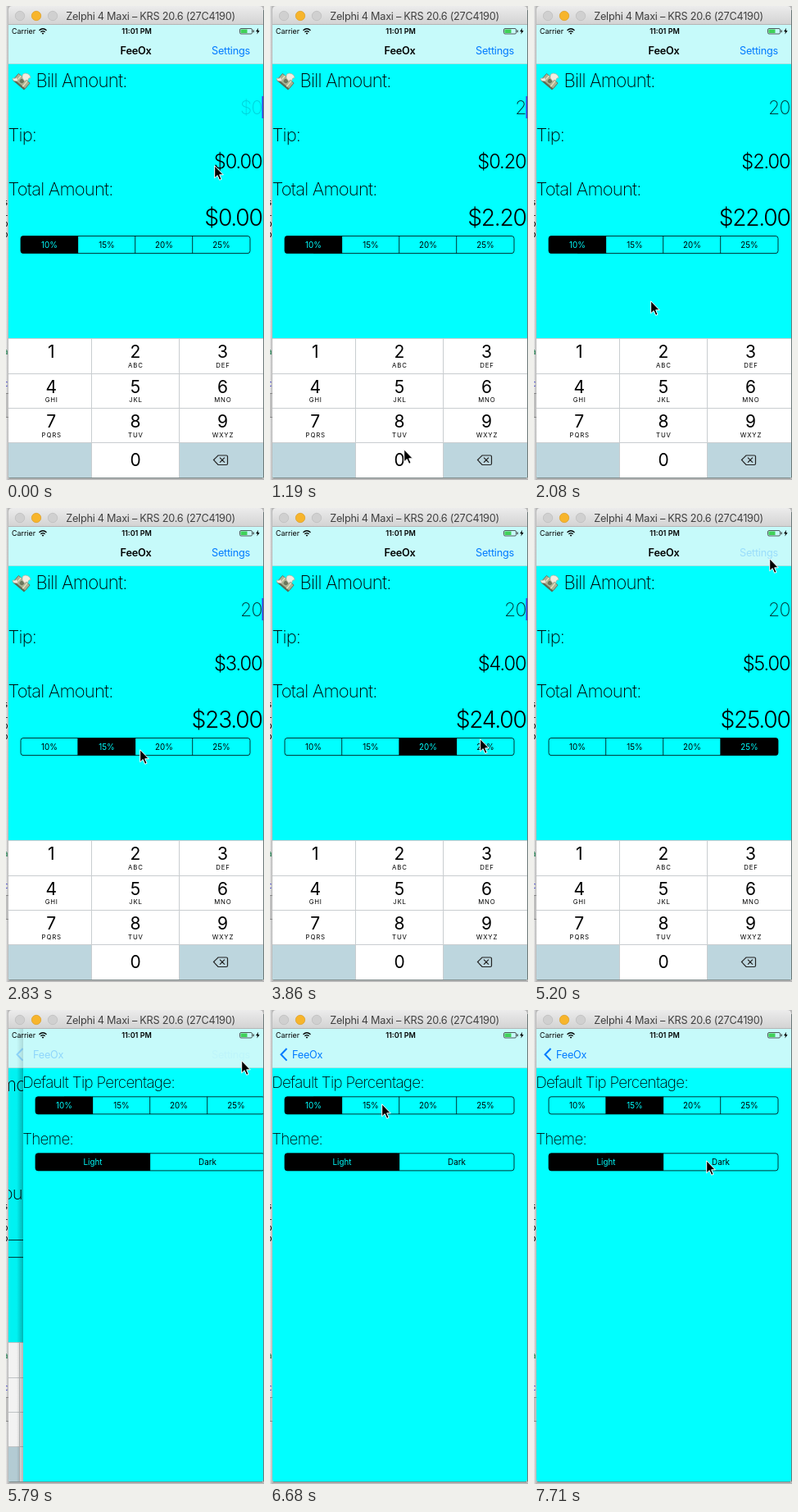
Recreate the animation shown at these times as an HTML page. Size 315 px wide and 578 px high, loop 8000 ms.

```html
<!DOCTYPE html>
<html lang="en">
<head>
<meta charset="utf-8">
<title>Tip calculator</title>
<style>
  html, body { margin: 0; width: 100%; height: 100%; overflow: hidden; background: #ddd; }
  svg { display: block; width: 315px; height: 578px; font-family: Inter, Roboto, sans-serif; }
  .thin { font-weight: 200; letter-spacing: -.036em; }
  .light { font-weight: 300; letter-spacing: -.045em; }
  .bar { font-size: 12.7px; letter-spacing: -.02em; }
  .blue { fill: #007aff; }
  .bold { font-weight: 600; }
  .mid { text-anchor: middle; }
  .end { text-anchor: end; }
  .letters { font-size: 7.8px; letter-spacing: .8px; }
  .code { font: 11px "DejaVu Sans Mono", monospace; }
</style>
</head>
<body>
<svg viewBox="0 0 315 578">
  <defs>
    <linearGradient id="title" x2="0" y2="1"><stop stop-color="#ececec"/><stop offset="1" stop-color="#d2d2d2"/></linearGradient>
    <linearGradient id="edge"><stop stop-color="#e6e6e6"/><stop offset="1" stop-color="#b4b4b4"/></linearGradient>
    <linearGradient id="shade"><stop stop-color="#000" stop-opacity="0"/><stop offset="1" stop-color="#000" stop-opacity=".25"/></linearGradient>
    <clipPath id="screen"><path d="M3 23H314V572q0 3-3 3H6q-3 0-3-3Z"/></clipPath>
    <clipPath id="strip"><path d="M0 0H3V578H0Z"/></clipPath>
  </defs>
  <g id="window"></g>
  <g id="app" clip-path="url(#screen)"></g>
  <path id="pointer" d="m-.3 .8v15l3.5-3.2 2.5 5.7 2.4-1-2.4-5.5h4.6z" stroke="#fff"/>
</svg>
<script>
const LOOP = 8000, TICK = 148.5, LEAD = 12;
const CYAN = '#0ff', RATES = [10, 15, 20, 25];
const $ = id => document.getElementById(id);

// Times below are counted in ticks.
const POINTER = [
  [0, 255, 194], [5, 158, 424], [6, 158, 426], [8, 164, 540], [10, 160, 556],
  [16, 137, 290], [17, 137, 290], [19, 164, 294], [21, 192, 294], [23, 192, 293],
  [26, 257, 281], [28, 259, 288], [30, 270, 107], [34, 288, 61], [39, 288, 61],
  [45, 137, 114], [47, 137, 114], [52, 211, 183]
];
const BILL = [[0, 0], [6, 2], [10, 20]];
const RATE = [[0, 0], [18, 1], [23, 2], [28, 3]];
const DEFAULT_RATE = [[0, 0], [47, 1]];
const CARET_OFF = [[3, 5], [14, 17], [21, 24], [28, 31], [35, 99]];
const PRESS_KEY = 5, PRESS_SETTINGS = 35, PUSH = 39;

const latest = (steps, n) => steps.filter(s => s[0] <= n).pop()[1];

function pointerAt(n) {
  const next = POINTER.findIndex(p => p[0] > n);
  if (next < 0) return POINTER[POINTER.length - 1].slice(1);
  const a = POINTER[next - 1], b = POINTER[next];
  const u = (n - a[0]) / (b[0] - a[0]), k = u * u * (3 - 2 * u);
  return [1, 2].map(i => a[i] + (b[i] - a[i]) * k);
}

const rect = (x, y, w, h, fill, more = '') =>
  `<rect x="${x}" y="${y}" width="${w}" height="${h}" fill="${fill}" ${more}/>`;
const text = (x, y, str, cls = '', size = '', fill = '') =>
  `<text x="${x}" y="${y}" class="${cls}" ${size && `font-size="${size}"`} ${fill && `fill="${fill}"`}>${str}</text>`;
const group = (content, dx = 0, opacity = 1) =>
  `<g transform="translate(${dx})" opacity="${opacity}">${content}</g>`;
const line = (d, stroke, width = 1) =>
  `<path d="${d}" fill="none" stroke="${stroke}" stroke-width="${width}"/>`;

function segments(y, labels, chosen) {
  const x = 18, width = 280, height = 21.1, stroke = .8;
  const w = width / labels.length, last = labels.length - 1;
  const left = x + chosen * w, isEnd = chosen === 0 || chosen === last;
  let out = rect(left, y, w, height, '#000', isEnd ? 'rx="3"' : '');
  if (isEnd) out += rect(chosen ? left : left + w / 2, y, w / 2, height, '#000');
  out += rect(x, y, width, height, 'none', `rx="3" stroke="#000" stroke-width="${stroke}"`);
  labels.forEach((label, i) => {
    if (i) out += line(`M${x + i * w - .3} ${y}v${height}`, '#000', stroke);
    out += text(x + (i + .5) * w, y + 14.2, label, 'mid', 9.8, i === chosen ? CYAN : '#000');
  });
  return out;
}

const percents = RATES.map(r => r + '%');

const flyingMoney = `
  <g transform="translate(19 92)">
    <g transform="rotate(40)">
      <rect x="-9" y="-4" width="18" height="10" fill="#5d6650"/>
      <rect x="-9" y="-5" width="18" height="9" fill="#a9b394" stroke="#66705a" stroke-width=".8"/>
      <circle cy="-.5" r="2.6" fill="#6c775d"/>
      <path d="M-5-5v9M5-5v9" stroke="#e9dfbf" stroke-width="1.4"/>
    </g>
    <path d="M-4-1Q-11 1-11-4-7-3-6-5ZM1-4Q0-10 5-10 11-9 11-4 8-5 8-1 5-3 4 0Z" fill="#f2ece0" stroke="#b5ab98" stroke-width=".7"/>
  </g>`;

function keypad(pressed) {
  const names = ['', 'ABC', 'DEF', 'GHI', 'JKL', 'MNO', 'PQRS', 'TUV', 'WXYZ'];
  const centers = [55.3, 158, 264.5], side = '#bdd6de';
  let out = rect(3, 405, 311, 170, '#fff');
  if (pressed) out += rect(105, 406, 106, 42, side);
  out += rect(3, 533, 101, 42, side) + rect(212, 533, 102, 42, side);
  out += line('M3 405.5H314M3 448.5H314M3 490.5H314M3 532.5H314M104.5 405V575M211.5 405V575', '#c9cdd0');
  names.forEach((name, i) => {
    const x = centers[i % 3], y = 429 + Math.floor(i / 3) * 42.5;
    out += text(x, y, i + 1, 'mid', 21) + text(x + .4, y + 11.5, name, 'mid letters');
  });
  out += text(158, 561, 0, 'mid', 21);
  return out + line('M253.5 553.5L259 548H269q1.5 0 1.5 1.5V558q0 1.5-1.5 1.5H259ZM261 550.7l6 6m0-6l-6 6', '#222', 1.2);
}

function home(n) {
  const bill = latest(BILL, n), rate = latest(RATE, n), tip = bill * RATES[rate] / 100;
  const money = v => '$' + v.toFixed(2);
  const caretOn = !CARET_OFF.some(([from, to]) => n >= from && n < to);
  return rect(3, 71, 311, 504, CYAN) + flyingMoney
    + text(36.6, 99, 'Bill Amount:', 'thin', 22.2)
    + (bill ? text(312.5, 132, bill, 'thin end', 23, '#033') : text(312.5, 132, '$0', 'thin end', 23, '#00d2da'))
    + (caretOn ? rect(312.5, 110, 1.5, 27, '#3b3be6') : '')
    + text(2.5, 165, 'Tip:', 'thin', 22)
    + text(312.6, 198, money(tip), 'light end', 23.6)
    + text(2.5, 231, 'Total Amount:', 'thin', 22)
    + text(312.6, 268, money(bill + tip), 'light end', 28.2)
    + segments(280.5, percents, rate)
    + keypad(n === PRESS_KEY);
}

const settings = n => rect(3, 71, 311, 504, CYAN)
  + text(2.2, 95, 'Default Tip Percentage:', 'thin', 18.8)
  + segments(105.8, percents, latest(DEFAULT_RATE, n))
  + text(2.2, 164, 'Theme:', 'thin', 18.8)
  + segments(174.8, ['Light', 'Dark'], 0);

const statusBar = rect(3, 23, 311, 48, '#c6fafa') + line('M3 70.5H314', '#8fd0d0', .6)
  + text(7, 34, 'Carrier', '', 8.9)
  + line('M40.5 29.8Q45 25.6 49.5 29.8M42.4 31.8Q45 29.4 47.6 31.8', '#000', 1.3)
  + '<path d="M43.7 33.2Q45 32 46.3 33.2L45 34.7Z"/>'
  + text(159.5, 34, '11:01 PM', 'mid bold', 9)
  + rect(285.5, 27.5, 15, 6.5, 'none', 'rx="1.5" stroke="#333" stroke-width=".8"')
  + rect(286.5, 28.5, 8, 4.5, '#3fd158') + rect(301.6, 29.4, 1.2, 2.8, '#333')
  + '<path d="M308 26.8L305 31.3H307L306.4 34.6 309.6 30H307.6Z"/>';

const homeTitle = text(158.5, 59, 'FeeOx', 'bar bold mid');
const settingsLink = text(251, 59, 'Settings', 'bar blue');
const backLink = line('M20.5 47L13.5 54.3 20.5 61.6', '#007aff', 2);
const backLabel = text(27, 59, 'FeeOx', 'bar blue');

function app(n) {
  if (n < PUSH)
    return home(n) + statusBar + homeTitle + group(settingsLink, 0, n < PRESS_SETTINGS ? 1 : .22);
  if (n === PUSH)
    return group(home(n), -88) + statusBar + rect(3, 71, 18, 504, '#000', 'opacity=".05"')
      + rect(13, 23, 8, 48, 'url(#shade)', 'opacity=".5"') + rect(13, 71, 8, 504, 'url(#shade)')
      + group(settings(n), 18)
      + group(backLink, 0, .28) + group(backLabel, 6, .28) + group(settingsLink, 0, .04);
  return settings(n) + statusBar + backLink + backLabel;
}

function drawWindow() {
  let out = rect(0, 0, 315, 578, '#b8b8b8') + rect(0, 0, 3, 578, 'url(#edge)')
    + rect(0, 473, 3, 28, '#bdbdbd') + line('M0 472.5H3M0 501.5H3', '#888');
  out += '<g clip-path="url(#strip)">';
  [...'sipo'].forEach((c, i) => out += text(-4, 243 + i * 13, c, 'code'));
  out += text(-4, 425, 'a', 'code', '', '#1c7c4c') + text(-4, 464, 'c', 'code', '', '#3434c8') + '</g>';
  out += '<path d="M3 23V5Q3 0 8 0H309Q314 0 314 5V23Z" fill="url(#title)"/>'
    + line('M3 22.5H314', '#b5b5b5') + line('M314.5 5V575', '#6c7878') + line('M4 575.5H313', '#7c8888');
  ['#d0d0d0', '#f7b52c', '#d0d0d0'].forEach((c, i) =>
    out += `<circle cx="${17 + i * 20}" cy="12" r="5.7" fill="${c}" stroke="${i === 1 ? '#dc9c20' : '#bababa'}" stroke-width=".7"/>`);
  $('window').innerHTML = out + text(176.5, 17, 'Zelphi 4 Maxi – KRS 20.6 (27C4190)', 'bar mid', '', '#404040');
}

let shown = -1;
function frame() {
  const n = Math.floor((performance.now() % LOOP + LEAD) / TICK);
  if (n !== shown) {
    shown = n;
    $('app').innerHTML = app(n);
    $('pointer').setAttribute('transform', `translate(${pointerAt(n)})`);
  }
  requestAnimationFrame(frame);
}

drawWindow();
frame();
</script>
</body>
</html>
```
